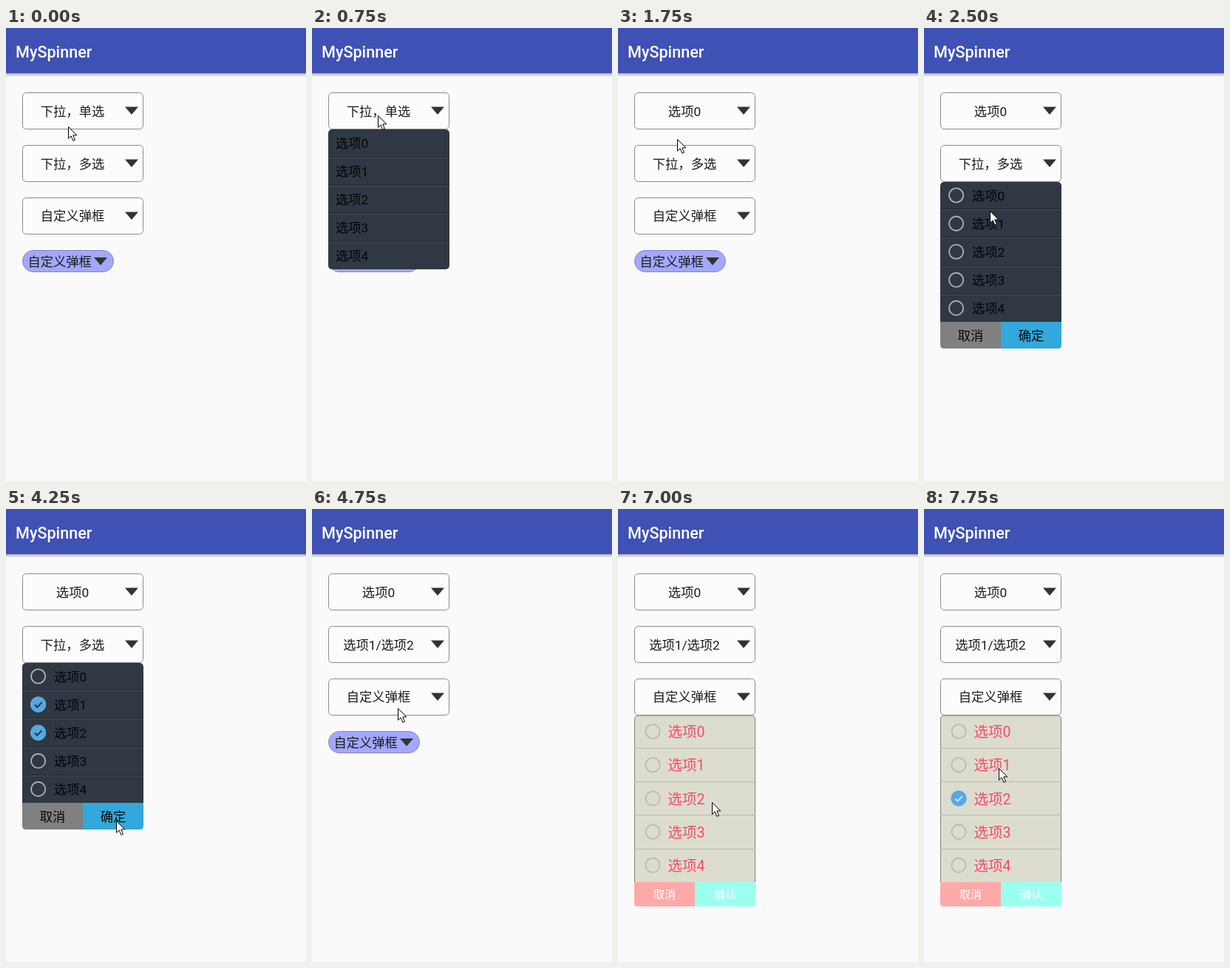
Animation of 406x612 px, one loop 8000 ms. Source, as an HTML page:

```html
<!DOCTYPE html>
<html lang="zh-CN">
<head>
<meta charset="utf-8">
<title>MySpinner</title>
<style>
html, body { margin: 0; width: 100%; height: 100%; overflow: hidden; background: #fafafa; }
svg { display: block; width: 406px; height: 612px; }
text { font: 17.3px Roboto, "Noto Sans CJK SC", "Noto Sans CJK", sans-serif; fill: #1c1c1c; }
.mid { text-anchor: middle; }
.title { font-size: 21.6px; font-weight: 500; fill: #fff; }
.dark text { fill: #050607; }
.light text { font-size: 19.5px; fill: #f8486a; }
.light text.mid { font-size: 15.1px; fill: #fff; }
.anim { animation: 8s step-end infinite; }
.menu1 { animation-name: menu1; }
.menu2 { animation-name: menu2; }
.menu3 { animation-name: menu3; }
.old1 { animation-name: old1; }
.new1 { animation-name: new1; }
.old2 { animation-name: old2; }
.new2 { animation-name: new2; }
.tickA { animation-name: tickA; }
.tickB { animation-name: tickB; }
.tickC { animation-name: tickC; }
.cursor { animation-name: cursor; }
@keyframes menu1 { 0%, 18.75% { opacity: 0 } 9.375% { opacity: 1 } }
@keyframes menu2 { 0%, 56.25% { opacity: 0 } 31.25% { opacity: 1 } }
@keyframes menu3 { 0% { opacity: 0 } 68.75% { opacity: 1 } }
@keyframes old1 { 0% { opacity: 1 } 18.75%, 100% { opacity: 0 } }
@keyframes new1 { 0% { opacity: 0 } 18.75% { opacity: 1 } }
@keyframes old2 { 0% { opacity: 1 } 56.25%, 100% { opacity: 0 } }
@keyframes new2 { 0% { opacity: 0 } 56.25% { opacity: 1 } }
@keyframes tickA { 0% { opacity: 0 } 37.5% { opacity: 1 } }
@keyframes tickB { 0% { opacity: 0 } 43.75% { opacity: 1 } }
@keyframes tickC { 0% { opacity: 0 } 93.75% { opacity: 1 } }
@keyframes cursor {
  0% { transform: translate(84px, 133px) }
  3.125% { transform: translate(89px, 114px) }
  9.375% { transform: translate(89px, 118px) }
  12.5% { transform: translate(90px, 138px) }
  15.625% { transform: translate(90px, 154px) }
  18.75% { transform: translate(88px, 154px) }
  21.875% { transform: translate(80px, 150px) }
  25% { transform: translate(100px, 173px) }
  31.25% { transform: translate(89px, 247px) }
  34.375% { transform: translate(88px, 256px) }
  37.5% { transform: translate(86px, 262px) }
  40.625% { transform: translate(85px, 285px) }
  43.75% { transform: translate(85px, 300px) }
  46.875% { transform: translate(100px, 330px) }
  50% { transform: translate(135px, 395px) }
  53.125% { transform: translate(149px, 421px) }
  56.25% { transform: translate(149px, 425px) }
  59.375% { transform: translate(116px, 269px) }
  62.5% { transform: translate(103px, 256px) }
  68.75% { transform: translate(106px, 262px) }
  71.875% { transform: translate(107px, 285px) }
  75% { transform: translate(110px, 320px) }
  78.125% { transform: translate(115px, 365px) }
  81.25% { transform: translate(121px, 395px) }
  84.375% { transform: translate(126px, 402px) }
  87.5% { transform: translate(127px, 396px) }
  93.75% { transform: translate(124px, 386px) }
  96.875% { transform: translate(101px, 350px) }
}
</style>
</head>
<body>
<svg id="stage" viewBox="0 0 406 612"></svg>
<script>
const label = (x, y, s, cls = '') => `<text x="${x}" y="${y}" class="${cls}">${s}</text>`;
const rect = (x, y, w, h, fill, more = '') =>
  `<rect x="${x}" y="${y}" width="${w}" height="${h}" fill="${fill}" ${more}/>`;
const line = (y, color) => `<path d="M22 ${y}H186" stroke="${color}"/>`;
const arrow = (x, y) => `<path d="M${x} ${y}h18l-9 10.5z" fill="#333"/>`;
const ring = (x, y, color) =>
  `<circle cx="${x}" cy="${y}" r="9.6" fill="none" stroke="${color}" stroke-width="1.9"/>`;
const tick = (x, y, back, mark, cls) => `<g class="anim ${cls}">
  <circle cx="${x}" cy="${y}" r="10.6" fill="${back}"/>
  <path d="M${x - 4.8} ${y + .2}l3.4 3.4 6.4-6.6" fill="none" stroke="${mark}" stroke-width="2.1"/></g>`;
const spinner = y =>
  rect(22.5, y + .5, 163, 49, '#fcfcfc', 'rx="5" stroke="#8c8c8c"') + arrow(161, y + 19.5);
const rows = draw => [0, 1, 2, 3, 4].map(draw).join('');

const darkRow = (top, x) => i => {
  const y = top + 38.1 * i;
  return (i ? line(Math.round(y) - .5, '#1f262e') + line(Math.round(y) + .5, '#46505b') : '')
    + label(x, y + 25.4, '选项' + i);
};

const menu1 = `<g class="anim menu1 dark">${rect(22, 137, 164, 189, '#2f3843', 'rx="5"')}
  ${rows(darkRow(136.5, 32))}</g>`;

const menu2 = `<g class="anim menu2 dark">${rect(22, 208, 164, 194, '#2f3843', 'rx="5"')}
  ${rows(darkRow(207.2, 65))}
  ${rows(i => ring(43.6, 226 + 38.1 * i, '#a9aeb4'))}
  ${tick(43.6, 264.1, '#54a9e4', '#2f3843', 'tickA')}
  ${tick(43.6, 302.2, '#54a9e4', '#2f3843', 'tickB')}
  <path d="M22 397h82v36H27q-5 0-5-5z" fill="#808080"/>
  <path d="M104 397h82v31q0 5-5 5h-77z" fill="#32a8dd"/>
  ${label(63, 421.7, '取消', 'mid')}${label(145, 421.7, '确定', 'mid')}</g>`;

const menu3 = `<g class="anim menu3 light">
  <path d="M22.5 506V284q0-5 5-5h153q5 0 5 5v222" fill="#dcdccf" stroke="#85857e"/>
  ${rows(i => {
    const y = 300.8 + 45.2 * i;
    return (i ? line(Math.round(y - 23) + .5, '#b9b9ae') : '')
      + ring(47, y - .3, '#bdbdb7') + label(67.5, y + 7.4, '选项' + i);
  })}
  ${tick(47, 391, '#54a9e4', '#dcdccf', 'tickC')}
  <path d="M22 504h82v33H26q-4 0-4-4z" fill="#ffa9a9"/>
  <path d="M104 504h82v29q0 4-4 4h-78z" fill="#9bfff0"/>
  ${label(63, 526.3, '取消', 'mid')}${label(145, 526.3, '确认', 'mid')}</g>`;

stage.innerHTML = `
  <defs><linearGradient id="shade" x2="0" y2="1">
    <stop stop-color="#000" stop-opacity=".3"/><stop offset="1" stop-color="#000" stop-opacity="0"/>
  </linearGradient></defs>
  ${rect(0, 0, 406, 612, '#fafafa')}
  ${rect(0, 61, 406, 5, 'url(#shade)')}
  ${rect(0, 0, 406, 61, '#3f51b5')}
  ${label(13, 39.6, 'MySpinner', 'title')}
  ${spinner(87)}${spinner(158)}${spinner(229)}
  ${label(90, 118.8, '下拉，单选', 'mid anim old1')}
  ${label(90, 118.8, '选项0', 'mid anim new1')}
  ${label(90, 189.6, '下拉，多选', 'mid anim old2')}
  ${label(90, 189.6, '选项1/选项2', 'mid anim new2')}
  ${label(90, 260.4, '自定义弹框', 'mid')}
  ${rect(22.5, 300.5, 123, 29, '#a3a8ff', 'rx="14.5" stroke="#8286c4"')}
  ${label(72.7, 321.8, '自定义弹框', 'mid')}
  ${arrow(119, 310)}
  ${menu1}${menu2}${menu3}
  <path class="anim cursor" d="M.5.5v15.8l3.6-3.4 2.8 6.4 2.6-1.1-2.7-6.3h5z"
    fill="#fff" stroke="#000"/>`;
</script>
</body>
</html>
```
